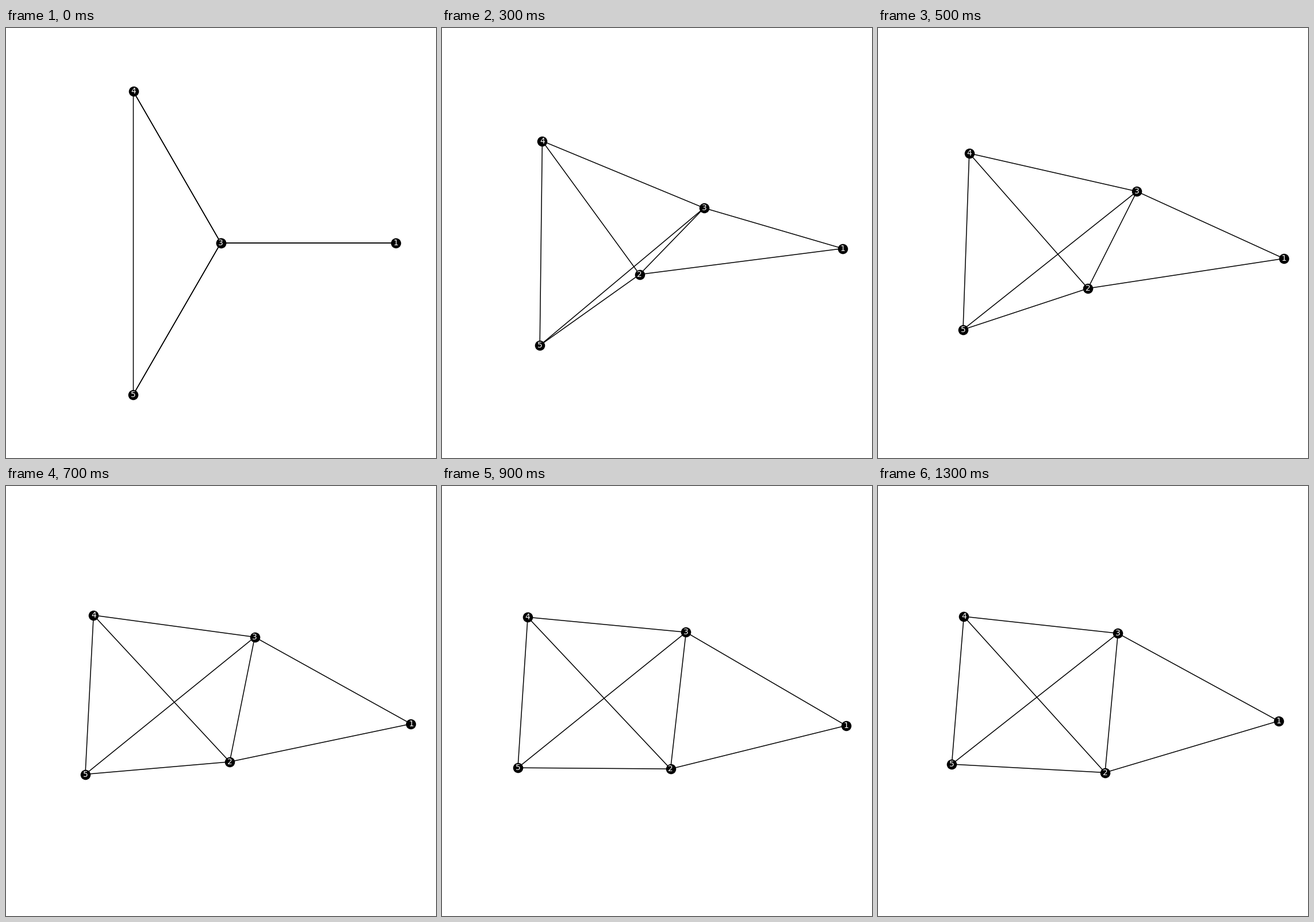
A matplotlib script that plays this animation: 748x748 px, repeating every 1.4 s.

```python
import numpy as np
import matplotlib.pyplot as plt
from matplotlib.animation import FuncAnimation
from matplotlib.collections import LineCollection

SIZE, DPI = 748, 100
FRAMES, INTERVAL = 14, 100
CENTER, RADIUS = (373.7, 373.9), 304.4
EDGES = [(1, 2), (1, 3), (2, 3), (2, 4), (2, 5), (3, 4), (3, 5), (4, 5)]
OUTER = [0, 3, 4]

# Key poses of nodes 1..5: pair just split, crossing, unfolded, settled.
POSE_TIMES = np.array([2, 4, 7, 13])
POSES = np.array([
    [(688.4, 373.9), (334.9, 418.4), (453.9, 329.2), (185.2, 181), (185.2, 566.6)],
    [(703.7, 392.8), (353.1, 439.6), (456.1, 297.8), (164.8, 210.2), (156.7, 538.1)],
    [(704.5, 413.8), (389.1, 479.8), (432.7, 262.8), (152.3, 224.8), (137.9, 501.5)],
    [(696.7, 408.8), (394.9, 498.5), (417.4, 256.3), (149.3, 227), (128.3, 484)],
])
SLOPES = np.gradient(POSES, POSE_TIMES, axis=0)


def starting_pose():
    """Outer nodes evenly on a circle, inner nodes together at its centre."""
    points = np.tile(CENTER, (5, 1))
    angles = np.radians([0, 120, 240])
    points[OUTER] += RADIUS * np.column_stack([np.cos(angles), -np.sin(angles)])
    return points


def relax(t):
    """Cubic Hermite motion through the key poses."""
    i = min(np.searchsorted(POSE_TIMES, t, side="right") - 1, len(POSES) - 2)
    h = POSE_TIMES[i + 1] - POSE_TIMES[i]
    u = (t - POSE_TIMES[i]) / h
    blend = u * u * (3 - 2 * u)
    return ((1 - blend) * POSES[i] + blend * POSES[i + 1]
            + h * u * (1 - u) * ((1 - u) * SLOPES[i] - u * SLOPES[i + 1]))


def layout(step):
    if step >= POSE_TIMES[0]:
        return relax(step)
    points = starting_pose()
    if step == 1:
        # The long outer edge contracts before the inner pair splits.
        points[OUTER, 1] = POSES[0, OUTER, 1]
    return points


fig = plt.figure(figsize=(SIZE / DPI, SIZE / DPI), dpi=DPI, facecolor="white")
ax = fig.add_axes([0, 0, 1, 1])
ax.set(xlim=(0, SIZE), ylim=(SIZE, 0))
ax.axis("off")

edges = ax.add_collection(LineCollection([], colors="black", linewidths=1.1,
                                         snap=False, zorder=1))
nodes, labels = [], []
for n in range(1, 6):
    # Each label sits on its own disc, so a later node hides an earlier one.
    nodes.append(ax.scatter([0], [0], s=160, c="black", linewidths=0, zorder=2 * n))
    labels.append(ax.text(0, 0, str(n), color="white", size=10, family="DejaVu Sans",
                          ha="center", va="center", zorder=2 * n + 1))


def draw(step):
    points = layout(step)
    edges.set_segments([(points[a - 1], points[b - 1]) for a, b in EDGES])
    for node, label, point in zip(nodes, labels, points):
        node.set_offsets([point])
        label.set_position(point)
    return [edges, *nodes, *labels]


anim = FuncAnimation(fig, draw, frames=FRAMES, interval=INTERVAL,
                     repeat=True, repeat_delay=0)
plt.show()
```
